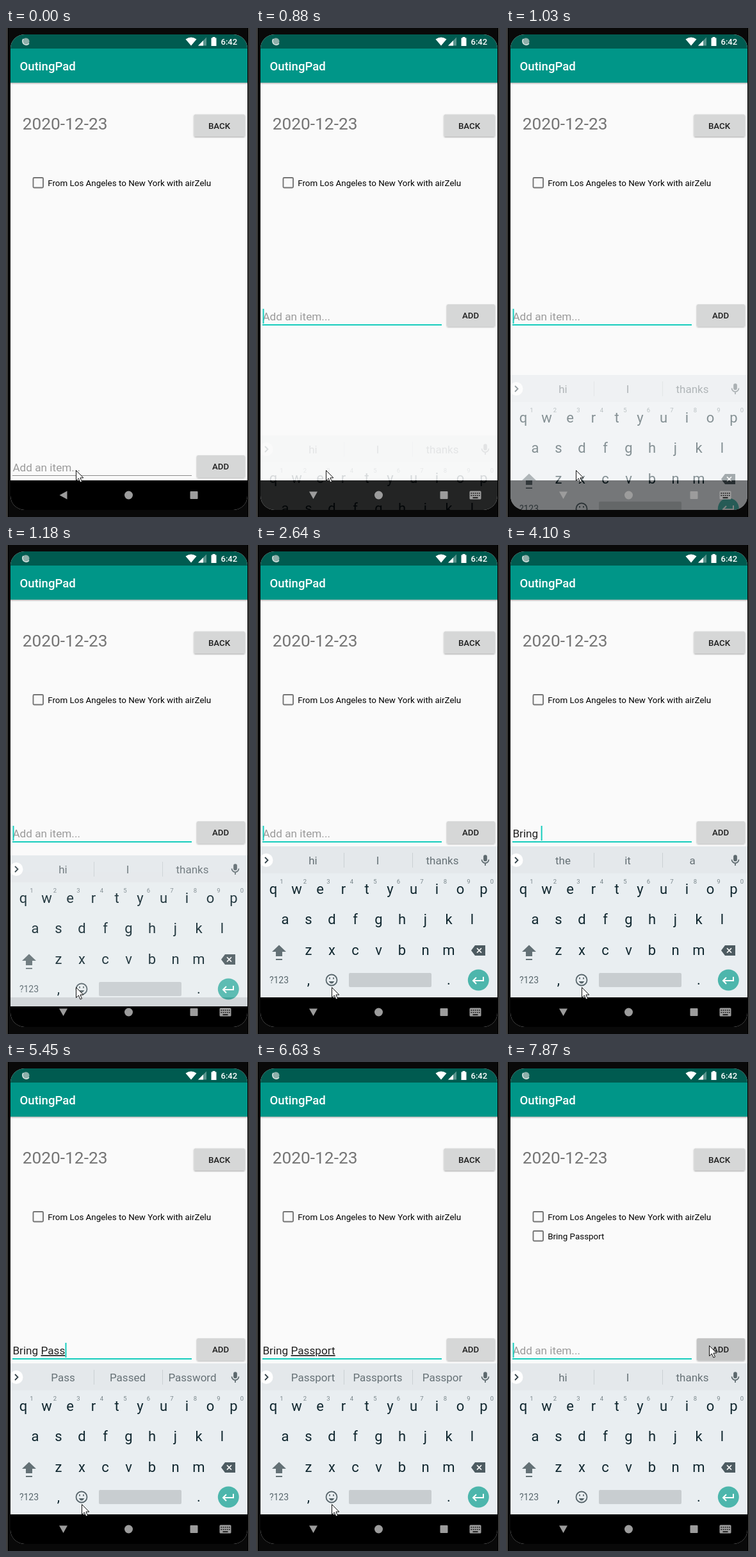
Write an HTML page that moves like this. It is 381x761 px and loops after 8000 ms.

```html
<!DOCTYPE html>
<html lang="en">
<head>
<meta charset="utf-8">
<title>Packing list</title>
<style>
  html, body { margin: 0; width: 100%; height: 100%; overflow: hidden; background: #090909; }
  svg { display: block; width: 381px; height: 761px; font-family: Roboto, sans-serif; }
  text { white-space: pre; }
  .mid { text-anchor: middle; }
  .label { font-size: 13.4px; }
  .caps { font-size: 13.3px; font-weight: 500; fill: #202020; text-anchor: middle; }
  .field { font-size: 17.2px; }
  .composing { text-decoration: underline 1px; text-decoration-skip-ink: none; }
  .key { font-size: 22px; fill: #10272f; text-anchor: middle; }
  .digit { font-size: 9.5px; fill: #78858a; text-anchor: middle; }
  .word { font-size: 17px; fill: #667176; text-anchor: middle; }
</style>
</head>
<body>
<svg viewBox="0 0 381 761">
  <defs>
    <clipPath id="screen"><rect x="7" y="10" width="370" height="740" rx="22"/></clipPath>
    <linearGradient id="shade" x2="0" y2="1">
      <stop stop-color="#000" stop-opacity=".3"/>
      <stop offset="1" stop-color="#000" stop-opacity="0"/>
    </linearGradient>
    <filter id="lift" x="-10%" y="-20%" width="120%" height="150%">
      <feDropShadow dx="0" dy="1" stdDeviation=".9" flood-opacity=".35"/>
    </filter>
  </defs>

  <rect width="381" height="761" fill="#090909"/>
  <path d="M1.5 0V761M379.5 0V761" stroke="#858585"/>

  <g clip-path="url(#screen)">
    <rect x="7" y="10" width="370" height="740" fill="#fafafa"/>
    <rect x="7" y="85" width="370" height="3" fill="url(#shade)"/>
    <rect x="7" y="32" width="370" height="53" fill="#009688"/>
    <rect x="7" y="10" width="370" height="22" fill="#005b50"/>

    <g fill="#fff">
      <circle cx="31" cy="21" r="5.5" fill="#8fb0ab"/>
      <path d="M27 17A5.7 5.7 0 1 0 36 24" fill="none" stroke="#d5e2e0" stroke-width="1.5"/>
      <path d="M280.5 17.5Q289 11.5 297.5 17.5L289 27.5Z"/>
      <path d="M300 27.5L313 14.5V27.5Z" opacity=".35"/>
      <path d="M300 27.5L308 19.5V27.5Z"/>
      <path d="M322.5 15.5V14H326.5V15.5H328.5V28H320.5V15.5Z"/>
      <text x="335.5" y="26" font-size="13" font-weight="500">6:42</text>
      <text x="21.5" y="66" font-size="18.6" font-weight="500">OutingPad</text>
    </g>

    <text x="25.7" y="157.500" font-size="26.3" fill="#757575">2020-12-23</text>
    <rect x="293.5" y="134.5" width="79.5" height="34.5" rx="2" fill="#d6d7d7" filter="url(#lift)"/>
    <text class="caps" x="333" y="157">BACK</text>
    <g id="items"></g>

    <g id="entry">
      <text id="typed" class="field" x="10.4" y="455"></text>
      <rect id="line" x="10" width="280"/>
      <rect id="caret" y="437" width="2" height="23" fill="#16cdbd"/>
      <rect id="add" x="298" y="430" width="75" height="34.5" rx="2" filter="url(#lift)"/>
      <text class="caps" x="335" y="452">ADD</text>
    </g>

    <rect x="7" y="704" width="370" height="46"/>

    <g id="keyboard">
      <rect x="7" y="469" width="370" height="235" fill="#e9eef1"/>
      <rect x="7" y="469" width="370" height="42" fill="#e4e8eb"/>
      <circle cx="16" cy="490.5" r="10.5" fill="#fff"/>
      <path d="M14 486l4.5 4.5l-4.5 4.5" fill="none" stroke="#33434a" stroke-width="1.8"/>
      <path d="M137.5 479V502M244.5 479V502" stroke="#cbd1d4"/>
      <g id="words"></g>
      <g fill="none" stroke="#5d696e" stroke-width="1.7">
        <rect x="356" y="483" width="4" height="8.5" rx="2" fill="#5d696e"/>
        <path d="M352.5 489.5a5.5 5.5 0 0 0 11 0M358 495V499"/>
      </g>
      <g id="keys"></g>
      <path d="M36 622.5L47 633H41V640H31V633H25Z" fill="#647176"/>
      <path d="M31 645H41" stroke="#647176" stroke-width="1.8"/>
      <path d="M336 631L342 623H358V639H342Z" fill="#4d5b61"/>
      <path d="M345 627.5l7 7m0-7l-7 7" stroke="#fff" stroke-width="1.7"/>
      <text class="mid" x="36" y="682" font-size="14" fill="#58666c">?123</text>
      <g fill="none" stroke="#58666c" stroke-width="1.8">
        <circle cx="118" cy="677" r="8.5"/>
        <path d="M113.5 679H122.5Q118 686 113.5 679Z" fill="#58666c" stroke="none"/>
        <path d="M115 673V675.5M121 673V675.5"/>
      </g>
      <rect x="145" y="666" width="129" height="22" rx="2" fill="#c8cdd0"/>
      <circle cx="347.3" cy="677" r="16.5" fill="#4db6ac"/>
      <path d="M355 672V678H339.500M344 673L339 678L344 683" fill="none" stroke="#fff" stroke-width="2"/>
    </g>

    <g fill="#9c9c9c">
      <path id="back"/>
      <circle cx="191.5" cy="727" r="6.5"/>
      <rect x="287.5" y="721" width="12" height="12" rx="1"/>
      <g id="switcher">
        <rect x="333.5" y="720.5" width="18" height="13" rx="1.5"/>
        <path d="M335.5 724H350M335.5 727.5H350" stroke="#000" stroke-width="1.6" stroke-dasharray="1.6 1.5"/>
        <path d="M338.5 731H346.5" stroke="#000" stroke-width="1.5"/>
      </g>
    </g>
  </g>
  <path id="pointer" d="M0 0V16L3.8 12.5L6.5 18.5L9 17.4L6.4 11.5H11.3Z" fill="#fff" stroke="#111"/>
</svg>

<script>
const LOOP = 8000;
const $ = id => document.getElementById(id);
const set = (id, attrs) => {
  for (const name in attrs) $(id).setAttribute(name, attrs[name]);
};
const label = (cls, x, y, text) => `<text class="${cls}" x="${x}" y="${y}">${text}</text>`;

// Each track lists [start time, value]; a value holds until the next start.
const at = (track, t) => track.filter(([start]) => start <= t).pop()[1];

const idleWords = 'hi I thanks';
// [finished text, word being composed, suggestions]
const typing = [
  [0, ['', '', idleWords]],
  [3080, ['', 'B', 'B But Be']],
  [3220, ['', 'Br', 'Br Bro Brother']],
  [3370, ['', 'Bri', 'Bri Bring Bright']],
  [3510, ['', 'Brin', 'Brin Bring Bringing']],
  [3660, ['', 'Bring', 'Bring Brings Bringing']],
  [4100, ['Bring ', '', 'the it a']],
  [4550, ['Bring ', 'P', 'P Please People']],
  [4700, ['Bring ', 'Pa', 'Pa Pay Part']],
  [5300, ['Bring ', 'Pas', 'Pas Past Password']],
  [5450, ['Bring ', 'Pass', 'Pass Passed Password']],
  [5750, ['Bring ', 'Passp', 'Passp Passport Passports']],
  [5900, ['Bring ', 'Passpo', 'Passpo Passport Passports']],
  [6180, ['Bring ', 'Passport', 'Passport Passports Passpor']],
  [7740, ['', '', idleWords]]
];
const caret = [[0, 0], [720, 1], [1330, 0], [1770, 1], [2210, 0], [2640, 1],
  [6630, 0], [7040, 1], [7460, 0], [7740, 1]];
// [offset, opacity]
const keyboard = [[0, [236, 0]], [880, [165, .15]], [1030, [71, .5]], [1180, [14, .9]], [1330, [0, 1]]];
const pointer = [[0, [109.5, 688.5]], [1330, [118.5, 688.5]], [6900, [150, 650]], [7040, [215, 570]],
  [7180, [282, 485]], [7320, [312, 448]], [7460, [317.5, 441.5]]];

function buildKeys() {
  const row = (letters, x, y) =>
    [...letters].map((c, i) => label('key', x + i * 36.5, y, c)).join('');
  const digits = [...'1234567890'].map((c, i) => label('digit', 40 + i * 36.5, 527, c)).join('');
  $('keys').innerHTML = row('qwertyuiop', 27, 543) + digits + row('asdfghjkl', 45.5, 590) +
    row('zxcvbnm', 82, 638) + label('key', 82, 684, ',') + label('key', 301, 684, '.');
}

const item = (text, y) =>
  `<rect x="42.5" y="${y - 8}" width="15.5" height="15.5" rx="1.5" fill="none" stroke="#757575" stroke-width="1.9"/>` +
  label('label', 65.2, y + 5, text);

function draw(t) {
  const [done, word, words] = at(typing, t);
  const focused = t >= 720, open = t >= 880;
  const [shift, opacity] = at(keyboard, t);

  $('items').innerHTML = item('From Los Angeles to New York with airZelu', 241) +
    (t >= 7740 ? item('Bring Passport', 271) : '');

  set('entry', { transform: `translate(0 ${open ? 0 : 235})` });
  const empty = !done && !word;
  $('typed').innerHTML = empty ? 'Add an item...'
    : `${done}<tspan class="composing">${word}</tspan>`;
  set('typed', { fill: empty ? '#9b9b9b' : '#212121' });
  set('line', focused ? { y: 461, height: 2, fill: '#16cdbd' } : { y: 461, height: 1, fill: '#8b8b8b' });
  set('caret', { x: 10.5 + (empty ? 0 : $('typed').getComputedTextLength()), opacity: at(caret, t) });
  set('add', { fill: t >= 7600 ? '#c3c4c4' : '#d6d7d7' });

  set('keyboard', { transform: `translate(0 ${shift})`, opacity });
  $('words').innerHTML = words.split(' ').map((w, i) => label('word', 89 + i * 101, 497, w)).join('');

  set('back', { d: open ? 'M83 721.5H96L89.5 733Z' : 'M95.5 720.5V733.5L83.5 727Z' });
  set('switcher', { opacity: open ? 1 : 0 });
  set('pointer', { transform: `translate(${at(pointer, t)})` });
}

buildKeys();
const began = performance.now();
function tick() {
  draw((performance.now() - began) % LOOP);
  requestAnimationFrame(tick);
}
tick();
</script>
</body>
</html>
```
